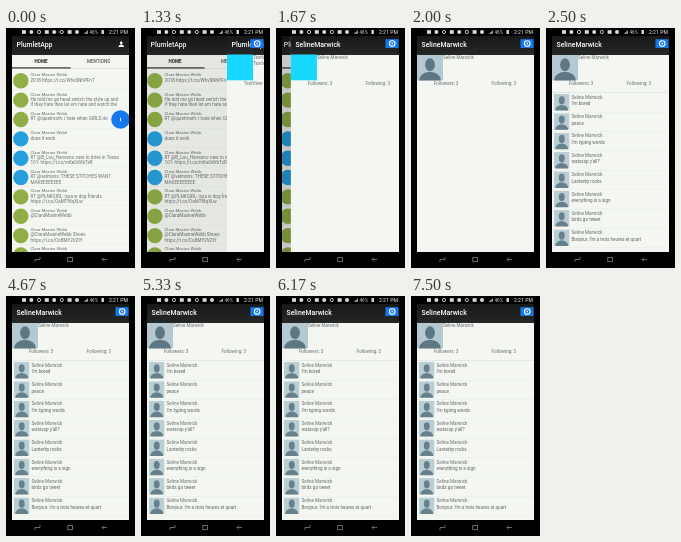
Animation of 129 by 240 pixels, one loop 8000 ms. Source, as an HTML page with a canvas:

```html
<!DOCTYPE html>
<html lang="en">
<head>
<meta charset="utf-8">
<title>Phone profile view</title>
<style>
html, body { margin: 0; width: 100%; height: 100%; overflow: hidden; background: #000; }
canvas { display: block; width: 129px; height: 240px; }
</style>
</head>
<body>
<canvas id="stage"></canvas>
<script>
const W = 129, H = 240, LOOP = 8000, STEP = 1000 / 6;
const LEFT = 6, RIGHT = 123, TOP = 8, BOTTOM = 224, WIDE = RIGHT - LEFT;
const ROW = 19.35, OPEN = 8, SETTLE = 11;
const PAPER = '#f3f6f1', INK = '#6c706e', RULE = '#e3e7e2', BLUE = '#1778ee';
const canvas = document.getElementById('stage');
const ctx = canvas.getContext('2d');
const ratio = Math.max(1, window.devicePixelRatio || 1);
canvas.width = W * ratio;
canvas.height = H * ratio;

const APP = 'PlumletApp', AUTHOR = 'Clara Maxine Webb', USER = 'Seline Marwick';
const posts = [
  ['2018 https://t.co/W6vSNhPFnT'],
  ['He told me go head switch the style up and', 'if they hate then let em hate and watch the'],
  ['RT @quietmoth: i hate when GIRLS do'],
  ['does it work'],
  ['RT @B_Lou_Hansens: new to drive in Texas', '101: https://t.co/mKe0dVbTzR'],
  ['RT @velmoris: THESE STITCHES WANT', 'MAKEEEEEEEE'],
  ['RT @PLNKGIRL: issa w dog friends', 'https://t.co/OaMTf8qXLw'],
  ['@ClaraMaxineWebb'],
  ['@ClaraMaxineWebb Shoes', 'https://t.co/CoBMY2VZIY'],
  ['']
];
const notes = ["I'm bored", 'peace', "I'm typing words", "watsssp y'all?", 'Lanterby rocks',
  'everything is a sign', 'birds go tweet', "Bonjour. I'm a trois heures et quart"];

function box(x, y, w, h, color) {
  ctx.fillStyle = color;
  ctx.fillRect(x, y, w, h);
}

function disc(x, y, r, color) {
  ctx.fillStyle = color;
  ctx.beginPath();
  ctx.arc(x, y, r, 0, Math.PI * 2);
  ctx.fill();
}

function ring(x, y, r, width, color) {
  ctx.strokeStyle = color;
  ctx.lineWidth = width;
  ctx.beginPath();
  ctx.arc(x, y, r, 0, Math.PI * 2);
  ctx.stroke();
}

function text(str, x, y, size = 4.6, color = INK, weight = 400, align = 'left') {
  ctx.font = `${weight} ${size}px Roboto, "Open Sans", sans-serif`;
  ctx.fillStyle = color;
  ctx.textAlign = align;
  ctx.textBaseline = 'middle';
  ctx.fillText(str, x, y);
}

function clipped(x, y, w, h, draw) {
  ctx.save();
  ctx.beginPath();
  ctx.rect(x, y, w, h);
  ctx.clip();
  draw();
  ctx.restore();
}

// Head and shoulders, cut at the edges of the square
function person(x, y, w, h, back, front) {
  clipped(x, y, w, h, () => {
    if (back) box(x, y, w, h, back);
    ctx.fillStyle = front;
    ctx.beginPath();
    ctx.ellipse(x + w / 2, y + h * 0.38, w * 0.19, h * 0.25, 0, 0, Math.PI * 2);
    ctx.ellipse(x + w / 2, y + h, w * 0.42, h * 0.34, 0, 0, Math.PI * 2);
    ctx.fill();
  });
}

function appBar(title) {
  const shade = ctx.createLinearGradient(0, TOP, 0, 27);
  shade.addColorStop(0, '#171919');
  shade.addColorStop(1, '#252827');
  box(LEFT, TOP, WIDE, 19, shade);
  text(title, 10.5, 16.5, 6.9, '#fff', 500);
}

function home() {
  box(LEFT, TOP, WIDE, BOTTOM - TOP, PAPER);
  appBar(APP);
  person(112, 12.5, 6.5, 6.5, null, '#fff');
  text('HOME', 35, 34, 4.6, '#222', 700, 'center');
  text('MENTIONS', 92.5, 34, 4.6, '#555', 500, 'center');
  box(LEFT, 40, WIDE, 0.6, '#d5d9d5');
  box(LEFT, 39.3, WIDE / 2, 1.2, '#333');
  posts.forEach((lines, i) => {
    const y = 42 + i * ROW;
    const blue = i > 2 && i < 6;
    disc(14.8, y + 10.8, 7.7, blue ? '#259fdd' : '#8fae45');
    text(AUTHOR, 24.5, y + 5, 4.3);
    lines.forEach((line, k) => text(line, 24.5, y + 10.3 + k * 5.2, 4.6));
    box(LEFT, y + ROW, WIDE, 0.4, RULE);
  });
}

function profile(step) {
  const named = step >= OPEN + 2;
  box(LEFT, TOP, WIDE, BOTTOM - TOP, PAPER);
  appBar(named ? USER.replace(' ', '') : APP);
  if (step < SETTLE + 1) box(LEFT, 26.5, 26, 25.8, '#18d8ff');
  else person(LEFT, 27, 26, 25.5, '#b3c8d1', '#5d7884');
  const label = (str, x, y) => text(named ? str : 'TextView', x, y, 4.6);
  label(USER, 32, 29.7);
  label('', 32, 35.5);
  label('Followers: 3', 22.8, 55.3);
  label('Following: 3', 80.6, 55.3);
  if (step < SETTLE + 2) return;
  box(LEFT, 64.5, WIDE, 0.5, '#d5dad5');
  notes.forEach((note, i) => {
    const y = 66 + i * ROW;
    person(8, y, 15.5, 16.5, '#b9cdd5', '#67818c');
    text(USER, 25.5, y + 3.4, 4.6);
    text(note, 25.5, y + 10, 4.6, '#5f6361');
    box(LEFT, y + 18, WIDE, 0.4, RULE);
  });
}

function statusBar() {
  const pale = '#d6dbd9';
  for (let i = 0; i < 8; i++) {
    const x = 16 + i * 7.6;
    if (i % 3 === 1) disc(x + 1.8, 4, 2, pale);
    else if (i % 3 === 2) ring(x + 1.8, 4, 1.6, 0.9, pale);
    else box(x, 2.2, 4, 3.6, pale);
  }
  for (let i = 0; i < 4; i++) box(78 + i, 5 - i * 0.8, 0.7, 0.8 + i * 0.8, pale);
  text('46%', 83.5, 4.2, 4.6, pale);
  box(95.5, 2, 2.4, 4, pale);
  text('2:21 PM', 122, 4.2, 5.2, '#e8ebe9', 400, 'right');
}

function path(points) {
  ctx.beginPath();
  points.forEach(([x, y], i) => i ? ctx.lineTo(x, y) : ctx.moveTo(x, y));
  ctx.stroke();
}

function navBar() {
  ctx.strokeStyle = '#7f8583';
  ctx.lineWidth = 0.8;
  path([[29, 234], [29, 231.5], [34, 231.5], [34, 229]]);
  ctx.strokeRect(61.8, 229.5, 4.6, 4.2);
  path([[101, 231.5], [96, 231.5], [98, 229.5]]);
  path([[96, 231.5], [98, 233.5]]);
}

// Touch button: glides up to the corner, then docks as a tile
function touch(step) {
  const p = step / 4;
  if (p >= 1) {
    box(109.5, 11.2, 13, 8.8, BLUE);
    ring(116.2, 15.5, 2.8, 1.1, '#fff');
    disc(116.2, 15.5, 0.9, '#d8e8ff');
    return;
  }
  const k = p * p * (3 - 2 * p);
  const x = 114.5 + 2 * k, y = 91.5 - 76 * k;
  clipped(LEFT, TOP, WIDE, BOTTOM - TOP, () => {
    disc(x, y, 9.3 - 4 * k, BLUE);
    box(x - 0.5, y - 1.8, 1, 3.6, '#dcebff');
  });
}

function draw(time) {
  const step = Math.floor(time / STEP + 0.05);
  const p = Math.max(0, Math.min(1, (step - OPEN) / (SETTLE - OPEN)));
  const shift = step < OPEN ? WIDE : 80 * (1 - p) ** 2;
  ctx.setTransform(ratio, 0, 0, ratio, 0, 0);
  box(0, 0, W, H, '#000');
  clipped(LEFT, TOP, WIDE, BOTTOM - TOP, () => {
    if (step < SETTLE) {
      // The old page drifts left and dims while it is covered
      const cover = 1 - shift / WIDE;
      ctx.translate(-3 * cover, 0);
      home();
      ctx.translate(3 * cover, 0);
      box(LEFT, TOP, WIDE, BOTTOM - TOP, `rgba(0, 0, 0, ${cover * 0.2})`);
    }
    ctx.translate(shift, 0);
    if (step >= OPEN) profile(step);
  });
  statusBar();
  navBar();
  touch(step);
}

const start = performance.now();
function tick() {
  draw((performance.now() - start) % LOOP);
  requestAnimationFrame(tick);
}
tick();
</script>
</body>
</html>
```
